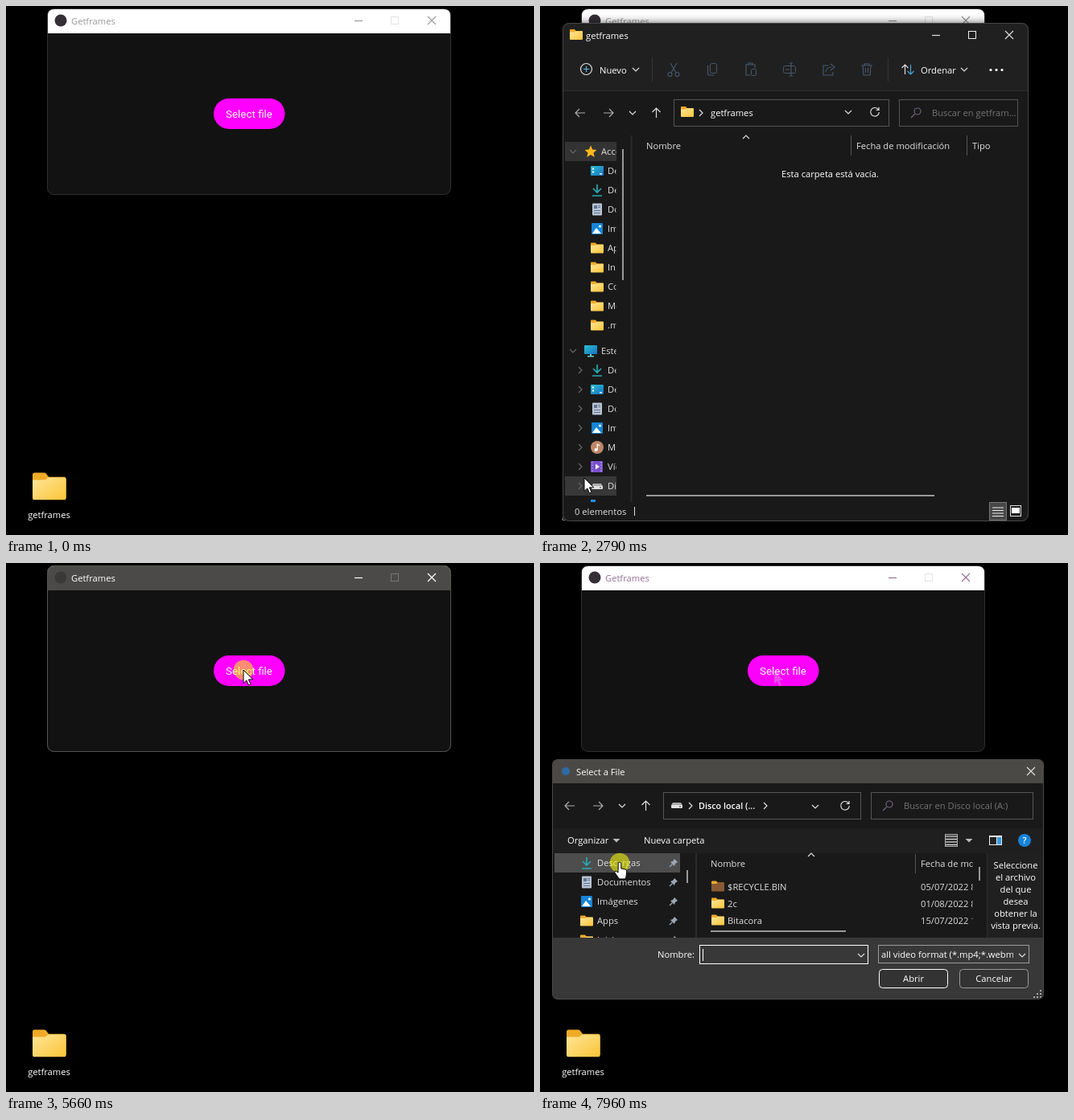
Animation, 656 px wide and 658 px high, one loop 8000 ms. Source, as an HTML page:

```html
<!DOCTYPE html>
<html lang="es">
<head>
<meta charset="utf-8">
<title>Getframes</title>
<style>
html, body { margin: 0; width: 100%; height: 100%; overflow: hidden; background: #000; }
svg { display: block; width: 656px; height: 658px; }
text { font: 11.2px "Open Sans", "Noto Sans", sans-serif; fill: #fff; white-space: pre; }
text.dim { fill: #747474; }
text.soft { fill: #dedede; }
text.mid { text-anchor: middle; }
text.btn { font: 13.4px Roboto, sans-serif; }
text.strong { font-weight: 600; font-size: 10.8px; }
.ln { fill: none; stroke: #ddd; stroke-width: 1.2; }
.faint { stroke: #666; }
.tool { fill: none; stroke: #46586c; stroke-width: 1.2; }
.anim, .step { animation: 8s linear infinite; }
.step { animation-timing-function: step-end; }

#pick { animation-name: pick; }
@keyframes pick { 0% {opacity:0} 14.375% {opacity:1} 30.625% {opacity:0} 53.25% {opacity:1} 59% {opacity:0} }
#idle { animation-name: idle; }
@keyframes idle { 0% {color:#999} 73.375% {color:#966f96} }
#active { animation-name: active; }
@keyframes active { 0% {opacity:0} 59% {opacity:1} 73.375% {opacity:0} }
#ghost { animation-name: ghost; }
@keyframes ghost { 0% {opacity:0} 76% {opacity:.4} }

#explorer { transform-origin: 250px 302px; animation-name: explorer; filter: drop-shadow(0 1px 6px #000b); }
@keyframes explorer {
  0%, 31.125% { opacity: 0; transform: scale(.9); }
  32.125%, 33.125% { opacity: .64; transform: scale(.932); }
  34.875%, 51.5% { opacity: 1; transform: none; }
  53.25%, 100% { opacity: 0; transform: scale(.9); }
}
#tools { animation-name: tools; }
@keyframes tools { 0% {opacity:0} 33.2% {opacity:1} }
#drive { animation-name: drive; }
@keyframes drive { 0% {opacity:1} 38.75% {opacity:0} }
#shut { animation-name: shut; }
@keyframes shut { 0% {opacity:0} 48% {opacity:1} }

#dialog { transform-origin: 320px 393px; animation-name: dialog; }
@keyframes dialog {
  0%, 73.375% { opacity: 0; transform: scale(.9); }
  75.875%, 100% { opacity: 1; transform: none; }
}
#scroll { animation-name: scroll; }
@keyframes scroll {
  0% { transform: translateY(-368px); }
  84.375% { transform: translateY(-296px); }
  85.125% { transform: translateY(-224px); }
  86.25% { transform: translateY(-152px); }
  88.5% { transform: translateY(-80px); }
  89.25% { transform: translateY(0); }
}
#thumb { animation-name: thumb; }
@keyframes thumb {
  0% { transform: translateY(20px); }
  84.375% { transform: translateY(16px); }
  85.125% { transform: translateY(12px); }
  86.25% { transform: translateY(8px); }
  88.5% { transform: translateY(4px); }
  89.25% { transform: translateY(0); }
}
#hover { animation-name: hover; }
@keyframes hover {
  0% { opacity: 0; transform: translateY(48px); }
  81% { opacity: 1; transform: translateY(48px); }
  95.25% { opacity: 1; transform: translateY(24px); }
  96.125% { opacity: 1; transform: translateY(0); }
}
#caret { animation-name: caret; }
@keyframes caret { 0% {opacity:1} 80.125% {opacity:0} 86.25% {opacity:1} 92.75% {opacity:0} 99.5% {opacity:1} }

#cursor { animation-name: cursor; }
@keyframes cursor {
  0%, 5.6% { transform: translate(575px,670px); }
  5.625% { transform: translate(569px,640px); }
  7.75% { transform: translate(430px,575px); }
  10% { transform: translate(270px,553px); }
  12.25% { transform: translate(130px,562px); }
  14.375% { transform: translate(60px,585px); }
  15.25%, 37.875% { transform: translate(55px,587px); }
  38.75% { transform: translate(75px,568px); }
  41.25% { transform: translate(250px,380px); }
  43.75% { transform: translate(520px,110px); }
  45.375%, 46.2% { transform: translate(620px,40px); }
  47.125% { transform: translate(604px,39px); }
  48%, 51.5% { transform: translate(587px,38px); }
  53.25% { transform: translate(520px,62px); }
  56% { transform: translate(325px,125px); }
  57.25%, 75% { transform: translate(295px,133px); }
  80.125% { transform: translate(95px,434px); }
  81.875%, 94.75% { transform: translate(99px,415px); }
  96.125%, 100% { transform: translate(99px,373px); }
}
#click { animation-name: click; }
@keyframes click {
  0% {opacity:0} 26.25% {opacity:.55} 27.125% {opacity:0} 28.875% {opacity:.55} 29.75% {opacity:0}
  48.875% {opacity:.55} 50.625% {opacity:0} 58.125% {opacity:.55} 59.875% {opacity:0}
  70.75% {opacity:.55} 72.5% {opacity:0} 99.5% {opacity:.55}
}
#arrow { animation-name: arrow; }
@keyframes arrow { 0% {opacity:1} 78.75% {opacity:0} }
#hand { animation-name: hand; }
@keyframes hand { 0% {opacity:0} 78.75% {opacity:1} }
</style>
</head>
<body>
<svg id="stage" viewBox="0 0 656 658" xmlns="http://www.w3.org/2000/svg"></svg>
<script>
const text = (x, y, s, cls = '') => `<text x="${x}" y="${y}" class="${cls}">${s}</text>`;
const rect = (x, y, w, h, fill, more = '') => `<rect x="${x}" y="${y}" width="${w}" height="${h}" fill="${fill}" ${more}/>`;
const box = (x, y, w, h, stroke, more = '', fill = 'none') =>
  rect(x + .5, y + .5, w - 1, h - 1, fill, `stroke="${stroke}" ${more}`);
const line = (d, cls = 'ln', more = '') => `<path d="${d}" class="${cls}" ${more}/>`;
const fill = (d, color, more = '') => `<path d="${d}" fill="${color}" ${more}/>`;
const at = (x, y, body) => `<g transform="translate(${x} ${y})">${body}</g>`;
const clip = (id, x, y, w, h, body) =>
  `<clipPath id="${id}">${rect(x, y, w, h, '#fff')}</clipPath><g clip-path="url(#${id})">${body}</g>`;
const group = (id, kind, body) => `<g id="${id}" class="${kind}">${body}</g>`;

const chevDown = (x, y, cls = 'ln') => line(`M${x - 4} ${y - 2}l4 4 4-4`, cls);
const chevUp = (x, y) => line(`M${x - 4} ${y + 2}l4-4 4 4`);
const chevRight = (x, y, cls = 'ln') => line(`M${x - 2} ${y - 4}l4 4-4 4`, cls);
const cross = (x, y, more = '') => line(`M${x - 5} ${y - 5}l10 10m0-10l-10 10`, 'ln', more);
const tri = (x, y) => fill(`M${x - 4.5} ${y - 2}h9l-4.500 4.500z`, '#bbb');

const folder = (x, y, k = 1, front = 'url(#gold)') => `<g transform="translate(${x} ${y}) scale(${k})">` +
  fill('M0 1q0-1 1-1h4.500q.6 0 1 .5l1.200 1.500h7.300q1 0 1 1v9h-16z', '#efab27') +
  fill('M0 3.500l6 0 1.500-1.200h7.700q.8 0 .8.8v8.900q0 1-1 1h-14q-1 0-1-1z', front) + '</g>';

const drive = fill('M-5-3h10l2 3h-14z', '#aaa') + rect(-7, 0, 14, 4, '#e2e2e2', 'rx="1"') + rect(3, 1.5, 2, 1, '#333');
const icons = {
  star: fill('M0-7.500l2.200 5 5.300.5-4 3.600 1.200 5.400-4.700-2.900-4.700 2.900 1.200-5.400-4-3.600 5.300-.5z', '#ffb91e'),
  desk: rect(-8, -6, 16, 12, 'url(#sea)', 'rx="1"') + fill('M-6-3.500h2v2h-2zm0 4h2v2h-2zM3 3h3v1.500h-3z', '#fff'),
  down: line('M0-7v10m-5-5l5 5 5-5M-6 7h12', 'ln', 'style="stroke:#27a8b5;stroke-width:1.7"'),
  doc: rect(-6, -7.5, 12, 15, '#b9c4d4', 'rx="1"') + fill('M-4-5h4v4h-4zM1-5h3v1h-3zm0 2h3v1h-3zM-4 1h8v1h-8zm0 3h8v1h-8z', '#5f7590'),
  img: rect(-7, -7, 14, 14, '#1585d8', 'rx="1"') + fill('M-6 6l5-7 6 7z', '#fff') + '<circle cx="3.500" cy="-3" r="1.600" fill="#fff"/>',
  mus: '<circle r="8" fill="#bd8768"/><circle cx="-1.500" cy="3" r="2" fill="#fff"/>' + line('M.3 3v-7l3 2', 'ln', 'style="stroke:#fff"'),
  vid: rect(-8, -7, 15, 14, '#7a50cc', 'rx="1"') + fill('M-2-3.500l5 3.500-5 3.500z', '#fff') +
    line('M-6-6v12M5-6v12', 'ln', 'style="stroke:#c9b5f2;stroke-dasharray:1.500 2"'),
  pc: rect(-8, -7, 16, 11, 'url(#sea)', 'rx="1"') + fill('M-1 4h2v2h3v1.500h-8v-1.500h3z', '#6cc'),
  drv: drive,
  os: drive + rect(-8, -7, 6, 6, '#1f8fe0'),
  dir: folder(-8, -6.500)
};
const pin = line('M-5 5l3.500-3.500', 'ln', 'style="stroke:#9aa7b4"') + fill('M-4-1l3-1 2-3 4 4-3 2-1 3z', '#9aa7b4');

// Shared navigation tree: [icon, label, kind]; kind 0 = group, 1 = pinned, 2 = child
const tree = [
  ['star', 'Acceso rápido', 0], ['desk', 'Desktop', 1], ['down', 'Descargas', 1], ['doc', 'Documentos', 1],
  ['img', 'Imágenes', 1], ['dir', 'Apps', 1], ['dir', 'Inicio', 1], ['dir', 'Copias', 1], ['dir', 'Media', 1],
  ['dir', '.media', 1], ['pc', 'Este equipo', 0], ['down', 'Descargas', 2], ['desk', 'Desktop', 2],
  ['doc', 'Documentos', 2], ['img', 'Imágenes', 2], ['mus', 'Música', 2], ['vid', 'Vídeos', 2],
  ['drv', 'Disco local (A:)', 2], ['os', 'OS (C:)', 2], ['drv', 'DATA (D:)', 2], ['drv', 'Disco local (A:)', 0]
];
const rows = (x, y, pins) => tree.map(([icon, label, kind], i) => {
  const ry = y + i * 24 + (i > 9) * 8 + (i > 19) * 8, ix = x + (kind ? 8 : 0);
  return (kind == 0 ? chevDown(x - 22, ry, i < 20 ? 'ln faint' : 'ln') : kind == 2 ? chevRight(x - 13, ry, 'ln faint') : '') +
    at(ix, ry, icons[icon]) + text(ix + 13, ry + 4, label, 'soft') + (pins && kind == 1 ? at(x + 116, ry, pin) : '');
}).join('');

const arrows = (x, y, gap) => line(`M${x + 6} ${y}h-12m5-5l-5 5 5 5`, 'ln', 'opacity=".75"') +
  line(`M${x + 29} ${y}h12m-5-5l5 5-5 5`, 'ln', 'opacity=".75"') + chevDown(x + 65, y) +
  line(`M${x + gap} ${y + 6}v-12m-5 5l5-5 5 5`);
const reload = (x, y) => line(`M${x + 4.5} ${y - 3}a5.300 5.300 0 1 0 .8 3M${x + 5} ${y - 6}v3.500h-3.500`);
const lens = (x, y) => line(`M${x - 6} ${y + 6}l4.500-4.500`, 'ln', 'style="stroke:#70657c"') +
  `<circle cx="${x + 2}" cy="${y - 2}" r="4" class="ln" style="stroke:#70657c"/>`;
const list = (x, y) => line(`M${x - 7} ${y - 5}h14m-14 3.500h14m-14 3.500h14m-14 3.500h14`, 'ln', 'style="stroke:#eee"');

const arrowPath = 'M0 0v16.500l3.800-3.600 2.600 6 2.600-1.100-2.600-5.900h5.300z';
const handPath = 'M-1.800.8a1.800 1.800 0 0 1 3.600 0v6.200l5 1q2.200.6 2 3l-.9 6.500-1 2.500h-7.500l-5.200-7.500q-1.300-2.200 1-2.400l2.800 2z';

const caption = (ink, box2) => text(81, 23, 'Getframes') .replace('class=""', `style="fill:${ink}"`) +
  line('M433 18.500h10', 'ln', `style="stroke:${ink}"`) + box(478, 13, 10, 10, box2) + cross(529, 18, `style="stroke:${ink}"`);
const head = 'M52 34v-22q0-8 8-8h484q8 0 8 8v22z';

const desktop = group('pick', 'step', rect(6, 572, 96, 70, '#222', 'rx="2"')) +
  folder(33, 580.5, 2.6) + text(53.5, 637, 'getframes', 'mid');

const app = box(51, 3, 502, 232, '#303030', 'rx="8"', '#121212') +
  group('idle', 'step', fill(head, '#fff') + '<circle cx="68" cy="18" r="7.500" fill="#332f35"/>' + caption('currentColor', '#e4e4e4')) +
  group('active', 'step', fill(head, '#4c4a48') + '<circle cx="68" cy="18" r="7.500" fill="#3b3938"/>' +
    caption('#fff', '#777') + box(51, 3, 502, 232, '#55534f', 'rx="8"')) +
  rect(258, 115, 88.5, 38, '#f0f', 'rx="19"') +
  group('ghost', 'step', at(291, 134, fill(arrowPath, '#d4b4d4'))) + text(302, 139, 'Select file', 'btn mid');

const tools = '<circle cx="57.500" cy="78.500" r="7" class="ln"/>' +
  line('M57.500 75v7m-3.500-3.500h7', 'ln', 'style="stroke:#5bb4e6"') +
  text(74, 84, 'Nuevo') + chevDown(119, 79) +
  line('M139.500 64v30M432.500 64v30', 'ln', 'style="stroke:#333"') +
  at(166, 79, line('M-4-8l7 12M4-8l-7 12', 'tool') + '<circle cx="-4.500" cy="6" r="2.500" class="tool"/><circle cx="4.500" cy="6" r="2.500" class="tool"/>') +
  at(214, 79, box(-3, -8, 9, 13, '#46586c', 'rx="2"') + line('M-5.500-5v10q0 2 2 2h6', 'tool')) +
  at(262, 79, line('M-1 7h-5v-13h11v4M-3-6v-2h5v2', 'tool') + box(0, -1, 7, 9, '#46586c', 'rx="1"')) +
  at(310, 79, box(-8, -5, 16, 10, '#46586c', 'rx="2"') + line('M2-8v16M0-8h4m-4 16h4M-5 0h5', 'tool')) +
  at(358, 79, line('M0-5h-6v12h12v-4M-3 3q1-6 7-6M3-7l5 4-5 4', 'tool')) +
  at(406, 79, line('M-7-5h14M-3-5v-2h6v2M-5-5l1 12h8l1-12M-1.500-2v6m3-6v6', 'tool')) +
  line('M453.500 85v-12m-4 4l4-4 4 4', 'ln') + line('M460.500 73v12m-4-4l4 4 4-4', 'ln', 'style="stroke:#4ba3d8"') +
  text(473, 84, 'Ordenar') + chevDown(527, 79) +
  [560, 567, 574].map(x => `<circle cx="${x}" cy="79.500" r="1.600" fill="#fff"/>`).join('');

const explorer = rect(28, 21, 579, 620, '#191919', 'rx="8"') +
  fill('M28 105v-76q0-8 8-8h563q8 0 8 8v76z', '#202020') + rect(28, 105, 579, 1, '#2e2e2e') +
  group('shut', 'step', fill('M561 22h38q7 0 7 7v23h-45z', '#c42b1c')) +
  folder(37, 29) + text(57, 41, 'getframes') +
  line('M487 36.500h10') + box(532, 31, 10, 10, '#eee') + cross(583, 36) +
  group('tools', 'step', tools) + arrows(50, 133, 94.5) +
  box(166, 116, 268, 34, '#555') + folder(175, 125) + chevRight(200, 133) + text(212, 137, 'getframes') +
  chevDown(383, 132) + reload(416, 132) +
  box(446, 116, 148, 34, '#555') + lens(467, 133) + text(487, 137, 'Buscar en getfram...', 'dim') +
  rect(31, 169, 64, 24, '#333') +
  group('drive', 'step', rect(31, 585, 64, 24, '#383838')) +
  clip('nav', 30, 162, 64.5, 455, rows(63, 181)) +
  rect(102, 178, 2, 163, '#999') + rect(112.5, 161, 2, 456, '#2b2b2b') +
  text(132, 178, 'Nombre', 'soft') + chevUp(256, 163) + text(393, 178, 'Fecha de modificación', 'soft') + text(537, 178, 'Tipo', 'soft') +
  rect(386, 161, 1, 25, '#555') + rect(530, 161, 1, 25, '#555') +
  text(300, 213, 'Esta carpeta está vacía.') +
  rect(132, 608, 358, 2, '#999') + text(43, 633, '0 elementos', 'soft') + rect(117, 623, 1, 11, '#ddd') +
  box(558, 617, 22, 23, '#777', '', '#484848') + list(569, 629) +
  box(584, 621, 14, 14, '#ddd') + rect(586, 624, 10, 7, '#fff') +
  box(28, 21, 579, 620, '#464646', 'rx="8"');

const files = [['$RECYCLE.BIN', '05/07/2022 8:14', '#8a5a35'], ['2c', '01/08/2022 8:40'], ['Bitacora', '15/07/2022 12:05']];
const preview = ['Seleccione', 'el archivo', 'del que', 'desea', 'obtener la', 'vista previa.'];
const grip = [[621, 533], [617, 537], [621, 537], [613, 541], [617, 541], [621, 541]];

const dialog = rect(15, 244, 611, 299, '#191919', 'rx="8"') +
  fill('M15 274v-22q0-8 8-8h595q8 0 8 8v22z', '#4b4946') +
  '<circle cx="32" cy="259" r="5" fill="#2c6ba6"/>' + text(45, 264, 'Select a File') + cross(610, 259) +
  arrows(37, 302, 94.5) +
  box(153, 285, 246, 34, '#555') + at(170, 301, drive) + chevRight(187, 302) + text(197, 306, 'Disco local (...', 'strong') +
  chevRight(280, 302) + chevDown(342, 303) + reload(379, 302) +
  box(411, 285, 202, 34, '#555') + lens(432, 302) + text(452, 306, 'Buscar en Disco local (A:)', 'dim') +
  rect(15, 330, 611, 31, '#1f1f1f') + text(34, 349, 'Organizar') + tri(95, 345) + text(129, 349, 'Nueva carpeta') +
  box(503, 337, 16, 16, '#aaa', '', '#333') + list(511, 345) + tri(533, 345) +
  rect(558, 339, 16, 12, '#eee') + rect(559, 341, 8, 9, '#222') + rect(568, 341, 5, 9, '#3a9be0') +
  '<circle cx="602" cy="345" r="8" fill="#1683d8"/>' + text(602, 349, '?', 'mid strong') +
  clip('pane', 16, 361, 178, 105,
    group('hover', 'step', rect(18, 361, 156, 24, '#4d4d4d')) +
    group('scroll', 'step', rect(18, 817 - 8, 156, 24, '#373737') + rows(50, 325, true))) +
  group('thumb', 'step', rect(182, 382, 2, 16, '#999')) +
  rect(193, 361, 2, 105, '#2b2b2b') +
  text(212, 378, 'Nombre', 'soft') + chevUp(337, 363) + rect(466, 362, 1, 24, '#555') +
  clip('dates', 200, 361, 337.5, 105, text(473, 378, 'Fecha de modificación', 'soft') +
    files.map(([name, date, tint], i) => folder(213, 395.5 + i * 21, 1, tint) + text(233, 407 + i * 21, name, 'soft') +
      text(473, 407 + i * 21, date, 'soft')).join('')) +
  rect(545, 378, 2, 17, '#999') + rect(212, 457, 168, 2, '#999') +
  rect(555, 361, 70, 105, '#202020') + rect(555, 361, 1, 105, '#303030') +
  preview.map((s, i) => text(591, 380 + i * 15, s, 'mid')).join('') +
  fill('M15 466h611v69q0 8-8 8h-595q-8 0-8-8z', '#383838') +
  text(146, 491, 'Nombre:') + box(198, 475, 210, 24, '#fff') + chevDown(399, 488) +
  group('caret', 'step', rect(202, 480, 1, 15, '#fff')) +
  box(420, 475, 188, 23, '#9b9b9b') + chevDown(599, 488) +
  clip('format', 421, 476, 167, 21, text(424, 491, 'all video format (*.mp4;*.webm;*.avi)')) +
  box(421, 505, 86, 24, '#fff', 'rx="4"', '#333') + text(464, 521, 'Abrir', 'mid') +
  box(521, 505, 86, 24, '#9b9b9b', 'rx="4"', '#333') + text(564, 521, 'Cancelar', 'mid') +
  grip.map(([x, y]) => rect(x, y - 2, 2, 2, '#aaa')).join('') +
  box(15, 244, 611, 299, '#4a4845', 'rx="8"');

const outline = 'stroke="#000" stroke-width="1" stroke-linejoin="round"';
const cursor = '<circle id="click" class="step" r="12.300" fill="#ff0"/>' +
  group('arrow', 'step', fill(arrowPath, '#fff', outline)) + group('hand', 'step', fill(handPath, '#fff', outline));

document.getElementById('stage').innerHTML =
  '<defs><linearGradient id="gold" x2="1" y2="1"><stop stop-color="#ffe69a"/><stop offset="1" stop-color="#fac437"/></linearGradient>' +
  '<linearGradient id="sea" x2="1" y2="1"><stop stop-color="#2bc0d0"/><stop offset="1" stop-color="#1670c4"/></linearGradient></defs>' +
  desktop + app + group('explorer', 'anim', explorer) + group('dialog', 'anim', dialog) + group('cursor', 'anim', cursor);
</script>
</body>
</html>
```
